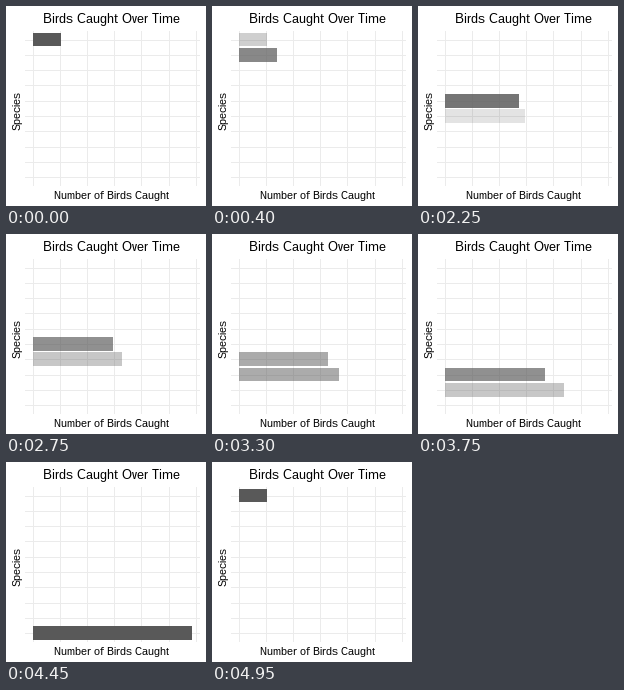
A matplotlib script for the animation above (5 s loop, 200 px wide and 200 px high).

```python
import matplotlib.pyplot as plt
from matplotlib.animation import FuncAnimation
from matplotlib.patches import Rectangle

SIZE, DPI = 200, 72
FRAMES, INTERVAL = 100, 50

plt.rcParams.update({
    "font.family": "Liberation Sans",
    "text.hinting": "native",
    "text.hinting_factor": 1,
    "text.kerning_factor": 6,
})

# Panel layout in pixels
LEFT, RIGHT, TOP, BOTTOM = 19, 194, 25, 180
ZERO, GRID_STEP = 26.85, 27.15
ROW, PITCH = 33.62, 15.27
BAR_HEIGHT = 0.9 * PITCH
BAR_ENDS = [55, 65, 70, 77, 101, 107, 116, 127, 146, 186]

# Last still frame before each cross-fade and the frame on which it settles
FADES = [(3, 10)] + [(10 * k + 4, 10 * k + 10) for k in range(1, 5)]
FADES += [(10 * k + 3, 10 * k + 9) for k in range(5, 10)]

fig = plt.figure(figsize=(SIZE / DPI, SIZE / DPI), dpi=DPI, facecolor="white")
ax = fig.add_axes([0, 0, 1, 1])
ax.set_xlim(0, SIZE)
ax.set_ylim(SIZE, 0)
ax.axis("off")


def box(x0, y0, x1, y1, color, z):
    """Add a crisp rectangle with its edges on whole pixels."""
    x0, y0, x1, y1 = (round(v) for v in (x0, y0, x1, y1))
    patch = Rectangle((x0, y0), x1 - x0, y1 - y0, facecolor=color,
                      linewidth=0, antialiased=False, zorder=z)
    return ax.add_patch(patch)


def label(x, y, text, size, rotation=0):
    ax.text(x, y, text, fontsize=size, color="black", ha="left",
            va="baseline", rotation=rotation, rotation_mode="anchor")


rows = [ROW + PITCH * i for i in range(len(BAR_ENDS))]
for y in rows:
    box(LEFT, y, RIGHT, y + 1, "#ebebeb", 1)
for i in range(7):
    x = ZERO + GRID_STEP * i
    box(x, TOP, x + 1, BOTTOM, "#ebebeb", 1)

bars = [box(ZERO, y - BAR_HEIGHT / 2, end, y + BAR_HEIGHT / 2, "#595959", 2)
        for y, end in zip(rows, BAR_ENDS)]

label(37, 17, "Birds Caught Over Time", 13)
label(48, 193, "Number of Birds Caught", 11)
label(15, 124, "Species", 11, rotation=90)


def progress(frame, fade):
    start, end = fade
    return min(max((frame - start) / (end - start), 0), 1)


def update(frame):
    shift = sum(progress(frame, fade) for fade in FADES)
    for i, bar in enumerate(bars):
        gap = abs(shift - i)
        gap = min(gap, len(bars) - gap)
        alpha = max(0, 1 - gap)
        bar.set_alpha(alpha)
        bar.set_visible(alpha > 0)
    return bars


anim = FuncAnimation(fig, update, frames=FRAMES, interval=INTERVAL,
                     repeat=True, repeat_delay=0, blit=False)
plt.show()
```
